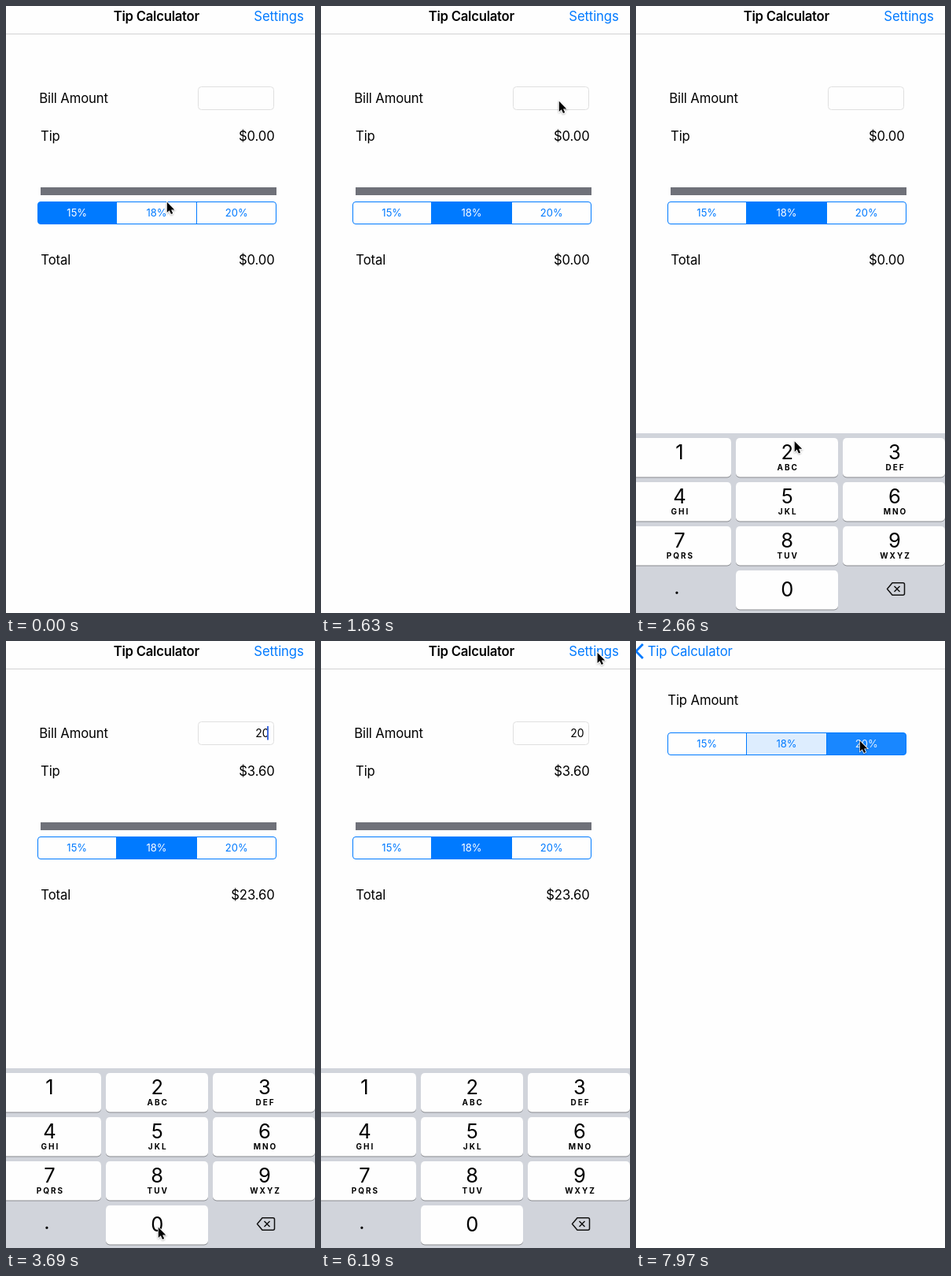
An HTML page that plays this animation: 393x770 px, repeating every 8 s.

```html
<!DOCTYPE html>
<html lang="en">
<head>
<meta charset="utf-8">
<title>Tip Calculator</title>
<style>
  html, body { margin: 0; width: 100%; height: 100%; overflow: hidden; background: #fefefe; }
  svg { display: block; width: 393px; height: 770px; }
  text { font: 16.7px Inter, "Liberation Sans", sans-serif; letter-spacing: -.12px; white-space: pre; }
  .blue { fill: #007aff; }
  .bold { font-weight: 600; letter-spacing: -.25px; }
  .end { text-anchor: end; }
  .mid { text-anchor: middle; }
  .seg { font-size: 13px; letter-spacing: 0; }
  .input { font-size: 14px; letter-spacing: 0; }
  .digit { font-size: 25.5px; letter-spacing: 0; }
  .letters { font-size: 10px; font-weight: 700; letter-spacing: 2px; }
</style>
</head>
<body>
<svg viewBox="0 0 393 770">
  <defs>
    <linearGradient id="shade">
      <stop offset="0" stop-opacity="0"/>
      <stop offset=".5" stop-opacity=".08"/>
      <stop offset="1" stop-opacity=".3"/>
    </linearGradient>
    <filter id="soft" x="-50%" y="-50%" width="200%" height="200%">
      <feDropShadow dx="0" dy="1" stdDeviation="1" flood-opacity=".35"/>
    </filter>
  </defs>

  <g id="home">
    <rect x="-15" width="414" height="770" fill="#fefefe"/>
    <text x="42.2" y="122.5">Bill Amount</text>
    <rect x="244.5" y="102.5" width="96" height="29" rx="4" fill="#fefefe" stroke="#e0e0e0"/>
    <text id="bill" class="input end" x="334.6" y="122"></text>
    <rect id="caret" x="332" y="108" width="2" height="17.5" fill="#426be0"/>
    <text x="44" y="170.5">Tip</text>
    <text id="tip" class="end" x="341.6" y="170.5"></text>
    <rect x="44" y="230" width="300" height="10" fill="#6f7179"/>
    <g id="rates"></g>
    <text x="44.3" y="327.5">Total</text>
    <text id="total" class="end" x="341.6" y="327.5"></text>
    <rect id="dim" x="-15" width="414" height="770" opacity="0"/>
    <g id="keyboard"></g>
  </g>

  <g id="settings">
    <rect x="-25" width="10" height="770" fill="url(#shade)"/>
    <rect x="-15" width="414" height="770" fill="#fefefe"/>
    <text x="40.3" y="80.5">Tip Amount</text>
    <g id="defaults"></g>
  </g>

  <rect width="393" height="35" fill="#fefefe" opacity=".75"/>
  <rect y="35" width="393" height="1" fill="#d2d2d4"/>
  <path id="chevron" d="M8.8 4 0 13 8.8 22" fill="none" stroke="#007aff" stroke-width="2.8"/>
  <g id="title">
    <text id="heading" class="bold" y="19">Tip Calculator</text>
    <text id="back" class="blue" y="19">Tip Calculator</text>
  </g>
  <text id="link" class="blue" x="315.3" y="19">Settings</text>

  <g id="cursor" filter="url(#soft)">
    <path d="M.8 .8V14L3.8 11.2 6 16 8.2 15 6.1 10.4H10.3Z" stroke="#fff" stroke-width="1.4" paint-order="stroke"/>
  </g>
</svg>
<script>
const $ = id => document.getElementById(id);

const LOOP = 8000, STEP = 147.5, LEAD = 15, LAST = 54;
const PERCENTS = [15, 18, 20];

const moves = [
  { end: 8, steps: 4, x: 302, y: 130 },
  { end: 11, steps: 2, x: 302, y: 120 },
  { end: 20, steps: 6, x: 197, y: 568 },
  { end: 24, steps: 2, x: 193, y: 743 },
  { end: 26, steps: 1, x: 284, y: 262 },
  { end: 35, steps: 4, x: 197, y: 260 },
  { end: 43, steps: 5, x: 352, y: 12 },
  { end: 51, steps: 4, x: 284, y: 126 }
];
const rateTaps = [
  { press: 1, release: 2, pick: 1 },
  { press: 28, release: 30, pick: 2 },
  { press: 36, release: 37, pick: 1 }
];
const defaultTaps = [{ press: 52, release: 54, pick: 2 }];
const strokes = [{ press: 21, digit: "2" }, { press: 24, digit: "0" }];
const FOCUS = 13, OPEN = 44;

const easeOut = u => 1 - (1 - Math.min(1, Math.max(0, u))) ** 3;

function cursorAt(k) {
  let x = 204, y = 248;
  for (const m of moves) {
    const u = easeOut((k - m.end + m.steps) / m.steps);
    x += (m.x - x) * u;
    y += (m.y - y) * u;
  }
  return [x, y];
}

const picked = (taps, first, k) => taps.reduce((now, t) => k >= t.release ? t.pick : now, first);

// Blue amount of segment i: pale while pressed, then a short crossfade
function fillAt(taps, first, i, k) {
  const tap = taps.find(t => k >= t.press && k <= t.release);
  const old = picked(taps, first, k - 1);
  if (tap && k === tap.release) return i === tap.pick ? .9 : i === old ? .13 : 0;
  if (tap && i === tap.pick) return .15;
  return i === old ? 1 : 0;
}

// Segmented control; returns its painter
function segments(id, y, taps, first) {
  const edges = [40, 140.5, 242.5, 344];
  const cells = PERCENTS.map((_, i) =>
    `<rect class="blue" x="${edges[i]}" y="${y}" width="${edges[i + 1] - edges[i]}" height="29"/>`).join("");
  const labels = PERCENTS.map((n, i) =>
    `<text class="seg mid" x="${(edges[i] + edges[i + 1]) / 2}" y="${y + 19}">${n}%</text>`).join("");
  const frame = `x="40.5" y="${y + .5}" width="303" height="28" rx="3.5"`;
  $(id).innerHTML = `<clipPath id="${id}Clip"><rect ${frame}/></clipPath>
    <g clip-path="url(#${id}Clip)">${cells}</g>
    <path d="M140.5 ${y}v29M242.5 ${y}v29" stroke="#007aff"/>
    <rect ${frame} fill="none" stroke="#007aff"/>${labels}`;
  const rects = $(id).querySelectorAll("rect.blue"), texts = $(id).querySelectorAll("text");
  return k => PERCENTS.forEach((_, i) => {
    const a = fillAt(taps, first, i, k), w = Math.max(0, (a - .2) / .8);
    rects[i].setAttribute("opacity", a);
    texts[i].style.fill = `rgb(${255 * w}, ${122 + 133 * w}, 255)`;
  });
}

function buildKeyboard() {
  const letters = ["", "ABC", "DEF", "GHI", "JKL", "MNO", "PQRS", "TUV", "WXYZ"];
  const key = (n, col, row, sub, drop) => {
    const x = -9 + 136 * col, y = 548 + 56 * row, mid = 55.4 + 136.8 * col;
    return `<rect x="${x}" y="${y + 1}" width="130" height="49.5" rx="5" fill="#898b90"/>
      <rect id="key${n}" x="${x}" y="${y}" width="130" height="49.5" rx="5" fill="#fefefe"/>
      <text class="digit mid" x="${mid}" y="${y + 26.5 + drop}">${n}</text>
      <text class="letters mid" x="${mid + 1}" y="${y + 40.8}">${sub}</text>`;
  };
  $("keyboard").innerHTML = `<rect x="-15" y="542" width="414" height="228" fill="#d1d4db"/>` +
    letters.map((s, i) => key(i + 1, i % 3, i / 3 | 0, s, i > 2 ? .5 : 0)).join("") +
    key(0, 1, 3, "", 6) +
    `<text class="digit mid" x="52" y="746">.</text>
    <path d="M326 731.8H339.5Q341.5 731.8 341.5 733.8V745.2Q341.5 747.2 339.5 747.2H326L319.5 739.5Z
      M328.5 736 335.5 743M335.5 736 328.5 743" fill="none" stroke="#111" stroke-width="1.5" stroke-linejoin="round"/>`;
}

buildKeyboard();
const paintRates = segments("rates", 248, rateTaps, 0);
const paintDefaults = segments("defaults", 116, defaultTaps, 1);

const move = (id, x, y) => $(id).setAttribute("transform", `translate(${x} ${y})`);
const fade = (id, a) => $(id).setAttribute("opacity", a);
const money = v => "$" + v.toFixed(2);

function draw(k) {
  const typed = strokes.filter(s => k > s.press);
  const bill = typed.map(s => s.digit).join("");
  const rate = PERCENTS[picked(rateTaps, 0, k)] / 100;
  $("bill").textContent = bill;
  $("tip").textContent = money(bill * rate);
  $("total").textContent = money(bill * (1 + rate));
  for (const s of strokes) $("key" + s.digit).style.fill = k === s.press ? "#b4b8c1" : "";

  // The caret blinks anew after each key
  const since = k - Math.max(FOCUS, ...typed.map(s => s.press));
  fade("caret", since >= 0 && since % 7 < 4 ? 1 : 0);
  move("keyboard", 0, 228 * (1 - easeOut((k - FOCUS) / 3)));
  paintRates(k);
  paintDefaults(k);

  const p = easeOut((k - OPEN + .5) / 6);
  move("home", -124.5 * p, 0);
  move("settings", 414 * (1 - p) + (p ? 0 : 20), 0);
  fade("dim", .1 * p);
  move("title", 136.7 - 122 * p ** 1.17, 0);
  fade("heading", 1 - p);
  fade("back", p);
  fade("chevron", Math.min(1, p * 1.3));
  fade("link", k < OPEN ? 1 : .3 * (1 - p));
  move("cursor", ...cursorAt(k));
}

let shown = -1;
function tick() {
  const k = Math.min(LAST, Math.floor((performance.now() % LOOP + LEAD) / STEP));
  if (k !== shown) draw(shown = k);
  requestAnimationFrame(tick);
}
tick();
</script>
</body>
</html>
```
